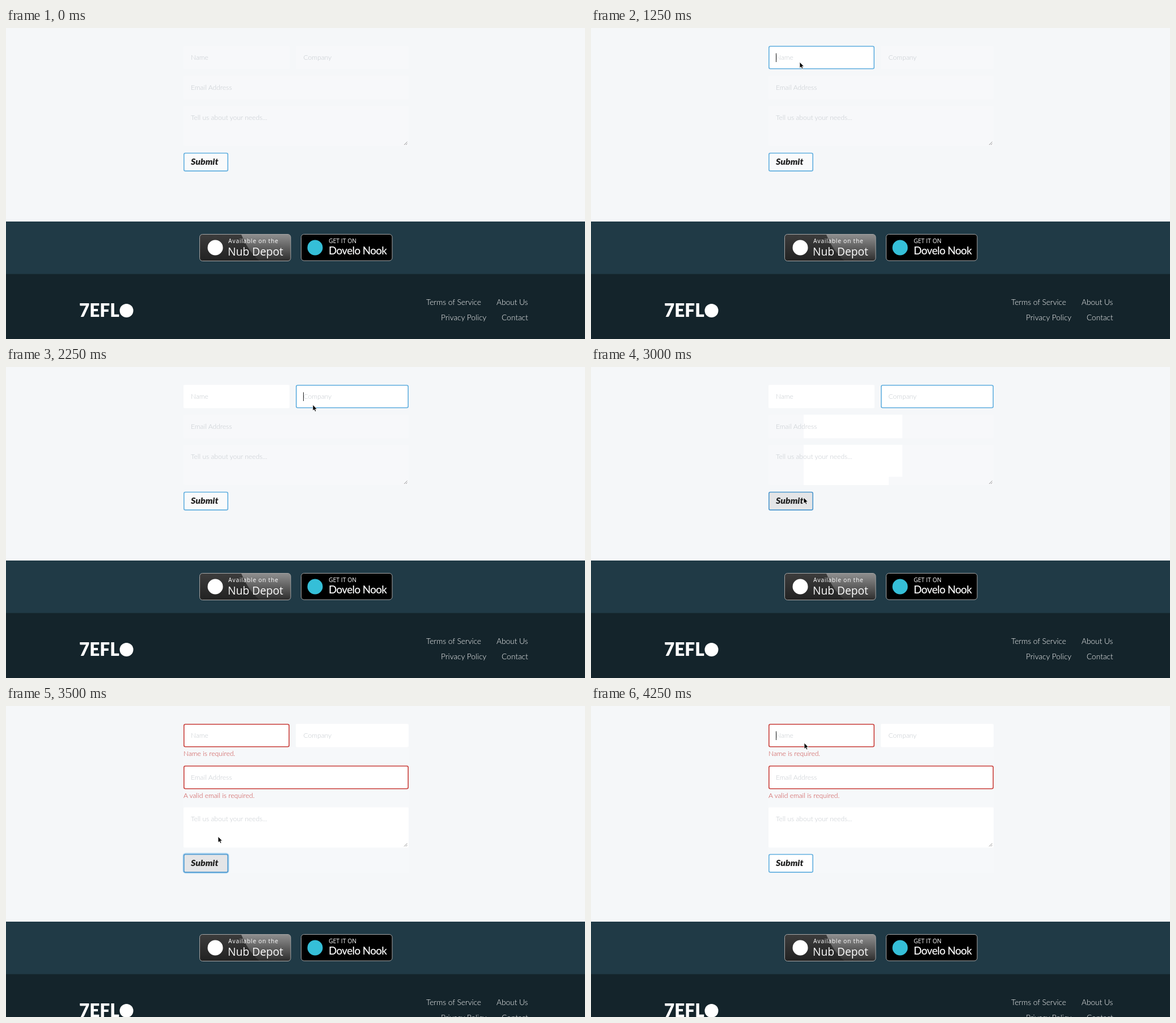
These frames come from a looping animation (1021 px wide and 548 px high, 4500 ms). An HTML page:

```html
<!DOCTYPE html>
<html lang="en">
<head>
<meta charset="utf-8">
<title>Contact form</title>
<style>
  html, body { margin: 0; width: 100%; height: 100%; overflow: hidden; background: #f5f7f9; }
  svg { display: block; width: 1021px; height: 548px; }
  text { font: 300 12.1px Lato, "Open Sans", sans-serif; white-space: pre; }
  .hint { fill: #c3c8cd; }
  .error { fill: #c8403f; }
  .submit { font: italic 900 15.9px Lato, sans-serif; fill: #222; }
  .link { font-size: 13.7px; fill: #fff; }
  .logo { font: 900 31.5px Lato, sans-serif; fill: #fff; }
  .small { font: 10.4px "Open Sans", sans-serif; fill: #fff; }
  .store { font: 19.2px "Open Sans", sans-serif; fill: #fff; }
  .market { font: 500 18.8px Lato, sans-serif; fill: #fff; letter-spacing: -.6px; }
</style>
</head>
<body>
<svg viewBox="0 0 1021 548">
  <defs>
    <linearGradient id="badge" x2="0" y2="1">
      <stop stop-color="#3c3c3c"/><stop offset="1" stop-color="#222"/>
    </linearGradient>
    <linearGradient id="gloss" x2="0" y2="1">
      <stop stop-color="#fff" stop-opacity=".42"/><stop offset="1" stop-color="#fff" stop-opacity=".04"/>
    </linearGradient>
    <clipPath id="repaint"></clipPath>
  </defs>
  <g id="form"></g>
  <g id="footer">
    <rect y="341" width="1021" height="93" fill="#203a46"/>
    <rect y="433.5" width="1021" height="120" fill="#14242b"/>
    <rect x="341.5" y="363.5" width="160.5" height="47" rx="5" fill="url(#badge)"/>
    <path d="M415 364H497Q502 364 502 369V406Q502 411 497 411H448Q428 395 415 364Z" fill="url(#gloss)"/>
    <rect x="341.5" y="363.5" width="160.5" height="47" rx="5" fill="none" stroke="#a6a6a6"/>
    <circle cx="369" cy="387" r="13.5" fill="#fff"/>
    <text class="small" x="392" y="379" letter-spacing=".7">Available on the</text>
    <text class="store" x="391" y="401">Nub Depot</text>
    <rect x="520.5" y="363.5" width="160.5" height="46.5" rx="5" stroke="#a6a6a6"/>
    <circle cx="545" cy="387" r="13.5" fill="#35bfd8"/>
    <text class="small" x="569" y="379">GET IT ON</text>
    <text class="market" x="569" y="399">Dovelo Nook</text>
    <text class="logo" x="129" y="509">7EFL</text>
    <circle cx="212.5" cy="498" r="12" fill="#fff"/>
    <text class="link" x="741" y="488">Terms of Service</text>
    <text class="link" x="865" y="488">About Us</text>
    <text class="link" x="767" y="515">Privacy Policy</text>
    <text class="link" x="874" y="515">Contact</text>
  </g>
  <path id="cursor" d="M0 0V10.6L2.4 8.5 4 12 5.9 11.2 4.3 7.8H7.5Z" stroke="#fff" stroke-width=".8"/>
</svg>
<script>
const $ = id => document.getElementById(id);
const FAINT = '#f7f8fa', WHITE = '#fff', BLUE = '#62afdf', RED = '#c9403c';

// Pointer stops: start time, x, y
const stops = [
  [250, 448.5, 65.5], [500, 373.5, 60.5], [1000, 368, 60], [1750, 499.5, 61.5],
  [2000, 537, 64], [2250, 541, 66.5], [2500, 407.5, 180], [2750, 375, 230],
  [3250, 374, 230], [3750, 376, 143.5], [4000, 378, 69.5], [4250, 376, 65]
];

const rect = (x, y, w, h, fill, extra = '') =>
  `<rect x="${x}" y="${y}" width="${w}" height="${h}" fill="${fill}" ${extra}/>`;
const text = (x, y, words, kind = 'hint') => `<text class="${kind}" x="${x}" y="${y}">${words}</text>`;
const caret = x => rect(x, 44.5, 1, 15.5, '#222');

function field(x, y, w, h, fill, border) {
  return border
    ? rect(x + .8, y + .8, w - 1.6, h - 1.6, fill, `rx="2.5" stroke="${border}" stroke-width="1.6"`)
    : rect(x, y, w, h, fill, 'rx="2"');
}

function submit(t, y) {
  const hover = t >= 3000 && t < 3750;
  const fading = t >= 3750 && t < 4000;
  const fill = hover ? '#e4e5e7' : fading ? '#f0f1f2' : t < 3000 ? '#f9fafb' : WHITE;
  const glow = t >= 3500 && t < 3750 ? .5 : t >= 3250 && t < 3500 ? .25 : 0;
  return rect(313, y - .5, 79, 33.5, 'none', `rx="4" stroke="#6bb5ea" stroke-width="3" opacity="${glow}"`)
    + field(313, y, 79, 33, fill, hover ? '#4d98cf' : BLUE)
    + text(326, y + 21.3, 'Submit', 'submit');
}

function draw(t) {
  const invalid = t >= 3250, settled = t >= 3500;
  const nameFocus = t >= 1250 && t < 2250, companyFocus = t >= 2250 && !invalid;
  const emailY = invalid ? 105 : 84, needsY = invalid ? 178.5 : 137;
  const nameFill = settled || (t >= 1250 && !invalid) ? WHITE : FAINT;
  const otherFill = settled ? WHITE : FAINT;
  const big = fill => field(313, emailY, 397, 41.5, fill) + field(313, needsY, 397, 71, fill);

  $('repaint').innerHTML = (t >= 2500 ? rect(407, 66, 142, 127.5, WHITE) : '')
    + (t >= 2750 ? rect(375, 66, 150, 150, WHITE) : '');

  $('form').innerHTML =
    (settled ? rect(313, 73, 397, 222, '#f6f8fa') : '')
    + field(313, 31.5, 187, 41, nameFill, nameFocus ? BLUE : settled && RED)
    + field(511, 31.5, 199, 41, companyFocus ? WHITE : otherFill,
        companyFocus ? BLUE : invalid && !settled && '#f1f3f5')
    + big(otherFill)
    + (t >= 2500 && !invalid ? `<g clip-path="url(#repaint)">${big(WHITE)}</g>` : '')
    + (settled ? field(313, emailY, 397, 41.5, WHITE, RED) : '')
    + text(326, 56, 'Name') + text(524.5, 56, 'Company')
    + text(326, emailY + 25, 'Email Address')
    + text(326, needsY + 24.8, 'Tell us about your needs...')
    + `<path d="M702 ${needsY + 69}l5.5 -5.5M705 ${needsY + 69}l2.5 -2.5" stroke="#888" stroke-width=".9"/>`
    + (invalid ? text(313, 88.3, 'Name is required.', 'error')
        + text(313, 161.8, 'A valid email is required.', 'error') : '')
    + submit(t, invalid ? 260.7 : 219.7)
    + (t >= 1250 && t < 1750 || t >= 4250 ? caret(326) : '')
    + (t >= 2250 && t < 2750 ? caret(524) : '');

  $('footer').setAttribute('transform', `translate(0 ${invalid ? 39 : 0})`);
  const stop = stops.filter(s => s[0] <= t).pop();
  $('cursor').setAttribute('transform', stop ? `translate(${stop[1]} ${stop[2]})` : 'translate(-50 0)');
}

let shown = -1;
function tick() {
  const t = Math.floor(performance.now() % 4500 / 250) * 250;
  if (t !== shown) draw(shown = t);
  requestAnimationFrame(tick);
}
tick();
</script>
</body>
</html>
```
